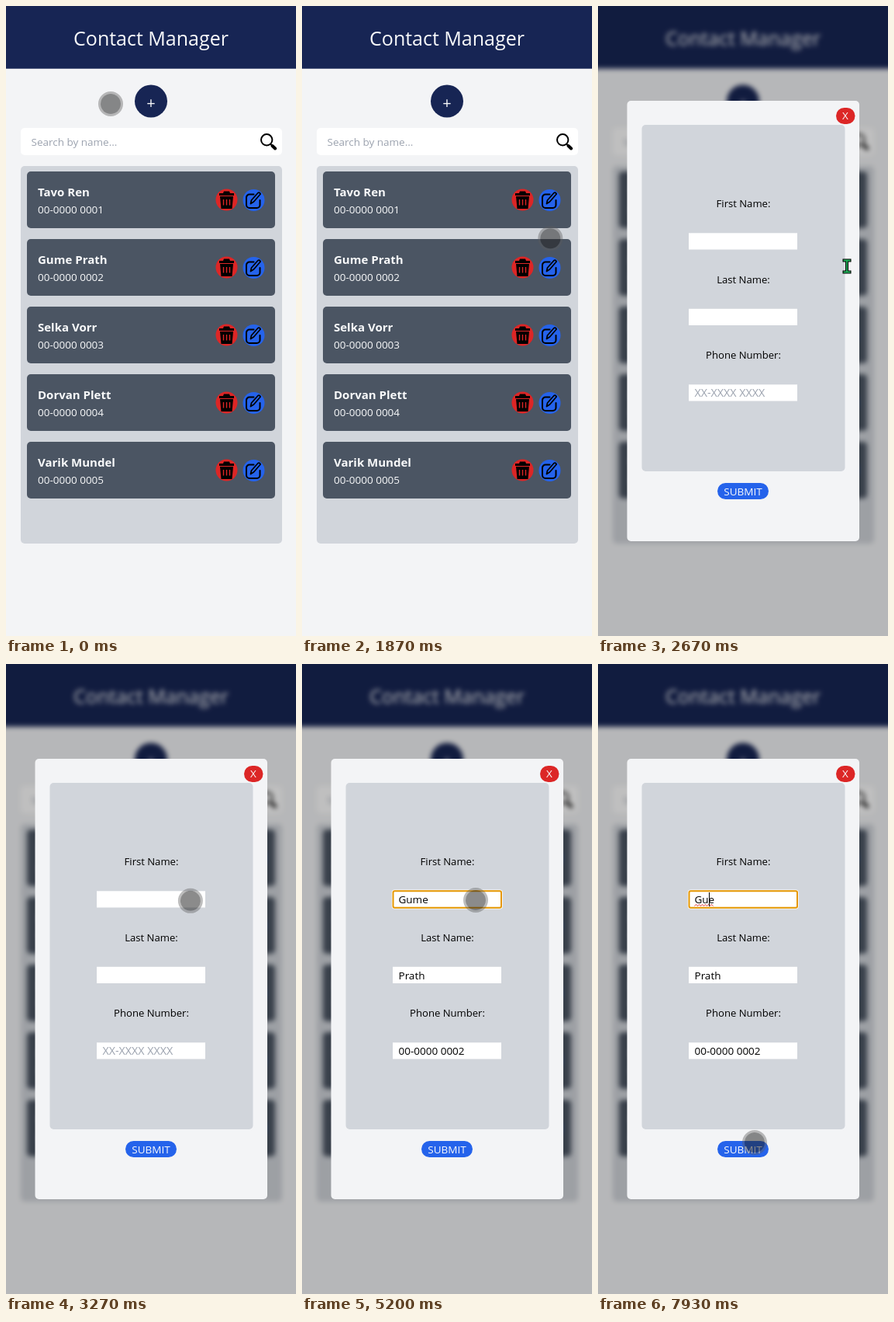
An HTML page for the animation above (8000 ms loop, 374 by 811 pixels).

```html
<!DOCTYPE html>
<html lang="en">
<head>
<meta charset="utf-8">
<title>Contact Manager</title>
<style>
  html, body { margin: 0; width: 100%; height: 100%; overflow: hidden; background: #f3f4f6; }
  svg { display: block; width: 100%; height: 100%; }
  text { font: 13.5px "Open Sans", "Noto Sans", sans-serif; white-space: pre; }
  .light { fill: #f9fafb; }
  .hint { fill: #9ca3af; }
  .center { text-anchor: middle; }
  .title { font-size: 25px; }
  .plus { font-size: 20px; }
  .name { font-size: 15px; font-weight: 700; }
  .label { font-size: 13.1px; }
  .mask { font-size: 14.3px; }
  .line { fill: none; stroke: #000; stroke-linecap: round; stroke-linejoin: round; }
  .blurred { filter: blur(3px); }
</style>
</head>
<body>
<svg viewBox="0 0 374 811">
  <defs>
    <g id="trash">
      <circle r="14" fill="#dc2626"/>
      <path d="M-9.5-8.5h5l1-2.5h7l1 2.5h5v3h-19z M-8.5-4.5h17l-1.5 16h-14z"/>
      <path d="M-4-.5v7.5M0-.5v7.5M4-.5v7.5" stroke="#dc2626" stroke-width="1.4"/>
    </g>
    <g id="edit">
      <circle r="14" fill="#2563eb"/>
      <path class="line" stroke-width="2" d="M0-7.5h-5.500a4 4 0 0 0-4 4v9.500a4 4 0 0 0 4 4h9.500a4 4 0 0 0 4-4v-6"/>
      <path class="line" stroke-width="1.7" d="M-4 4.500l1-4.500l8.500-9.500q2-1 3.200 1.500l-8.700 10z"/>
    </g>
  </defs>

  <g id="page">
    <rect x="-30" y="-30" width="434" height="871" fill="#f3f4f6"/>
    <rect x="-30" y="-30" width="434" height="110.700" fill="#172554"/>
    <text class="title light center" x="187" y="51">Contact Manager</text>
    <circle cx="187" cy="122.500" r="21" fill="#172554"/>
    <text class="plus light center" x="187" y="132">+</text>
    <rect x="19" y="157" width="337" height="35" rx="5" fill="#fff"/>
    <text class="hint" x="32.500" y="180">Search by name...</text>
    <circle class="line" cx="336.200" cy="172.300" r="7.200" stroke-width="2"/>
    <path class="line" d="M341.500 178l1.500 1.500" stroke-width="2"/>
    <path class="line" d="M343.500 180l3.700 3.500" stroke-width="4"/>
    <rect x="19" y="206" width="337" height="486" rx="5" fill="#d1d5db"/>
    <g id="cards"></g>
  </g>

  <g id="modal">
    <rect width="374" height="811" fill-opacity=".25"/>
    <rect x="37.500" y="122" width="299.500" height="567" rx="5" fill="#f3f4f6"/>
    <rect x="56.500" y="153" width="262" height="446" rx="5" fill="#d1d5db"/>
    <rect x="307" y="131" width="24.500" height="21" rx="10.500" fill="#dc2626"/>
    <text class="light center" x="319" y="146">X</text>
    <g id="fields"></g>
    <g id="focus" fill="none">
      <rect x="117.500" y="292.300" width="139.500" height="21.500" rx="2" stroke="#fff" stroke-width="3.500"/>
      <rect x="117.500" y="292.300" width="139.500" height="21.500" rx="2" stroke="#e59700" stroke-width="2"/>
    </g>
    <path id="squiggle" fill="none" stroke="#e03030"/>
    <rect id="caret" y="294" width="1" height="18"/>
    <rect x="154" y="614" width="66" height="21" rx="10.500" fill="#2563eb"/>
    <text class="light center" x="187" y="629.700">SUBMIT</text>
  </g>

  <g id="touch">
    <circle r="14.500" fill="none" stroke="#5a5a5a" stroke-opacity=".4" stroke-width="3"/>
    <circle r="13" fill="#202020" fill-opacity=".52"/>
  </g>
  <g id="beam" fill="none" stroke-linecap="square">
    <path d="M-3.500-7.500h7M0-7.500v15M-3.500 7.500h7" stroke="#000" stroke-width="4"/>
    <path d="M-3.500-7.500h7M0-7.500v15M-3.500 7.500h7" stroke="#21b35a" stroke-width="1.800"/>
  </g>
</svg>

<script>
const LOOP = 8000, FPS = 15;
const $ = id => document.getElementById(id);

const contacts = ["Tavo Rend", "Gume Prath", "Selka Vorr", "Dorvan Plett", "Varik Mundel"];
contacts[0] = "Tavo Ren";
const phone = i => `00-0000 000${i + 1}`;

$("cards").innerHTML = contacts.map((name, i) => `
  <g transform="translate(0 ${i * 87})">
    <rect x="27" y="213" width="320" height="73" rx="5" fill="#4b5563"/>
    <text class="name light" x="41" y="245">${name}</text>
    <text class="light" x="41" y="267">${phone(i)}</text>
    <use href="#trash" x="284.5" y="249.5"/>
    <use href="#edit" x="319.5" y="250"/>
  </g>`).join("");

$("fields").innerHTML = ["First Name:", "Last Name:", "Phone Number:"].map((label, i) => `
  <g transform="translate(0 ${i * 97.5})">
    <text class="label center" x="187.5" y="259">${label}</text>
    <rect x="117" y="292.3" width="140" height="21.2" fill="#fff"/>
    <text id="value${i}" x="124.5" y="308"></text>
  </g>`).join("");

const pen = document.createElement("canvas").getContext("2d");
pen.font = '13.5px "Open Sans", "Noto Sans", sans-serif';
const textWidth = s => pen.measureText(s).width;

// Pointer path: time, x, y
const path = [
  [133, 135, 126], [933, 291, 265], [1000, 290, 264], [1733, 320, 296],
  [1800, 320, 297], [2267, 326, 336], [2400, 321, 335], [2667, 321, 335],
  [3400, 230, 302], [3467, 226, 303], [4133, 226, 303], [4200, 225, 306],
  [4267, 224, 304], [7467, 224, 304], [7800, 203, 606], [7867, 202, 620], [7933, 202, 616]
];

// First-name field: time, value, text left of the caret (null hides it)
const typing = [
  [0, "", null], [3800, "", ""], [3930, "Gume ", "Gume "], [4260, "Gume ", null],
  [4730, "Gume ", "Gume "], [5200, "Gume ", null], [5730, "Gume ", "Gume "],
  [6200, "Gume ", "Gume"], [6530, "Gume ", "Gum"], [6860, "Gue ", "Gu"],
  [7000, "Gue ", null], [7530, "Gue ", "Gu"]
];

function pointerAt(t) {
  const next = path.findIndex(p => p[0] > t);
  if (next < 0) return path.at(-1).slice(1);
  if (next === 0) return path[0].slice(1);
  const [t0, x0, y0] = path[next - 1], [t1, x1, y1] = path[next];
  const u = (t - t0) / (t1 - t0), e = u * u * (3 - 2 * u);
  return [x0 + (x1 - x0) * e, y0 + (y1 - y0) * e];
}

const show = (id, on) => $(id).setAttribute("visibility", on ? "visible" : "hidden");

function squiggle(width) {
  let d = "M124.5 311.5";
  for (let x = 2, up = true; x <= width; x += 2, up = !up) d += `L${124.5 + x} ${up ? 309.5 : 311.5}`;
  return d;
}
$("squiggle").setAttribute("d", squiggle(textWidth("Gue")));

function draw(t) {
  const open = t >= 2660, filled = t >= 3930;
  $("modal").style.display = open ? "" : "none";
  $("page").classList.toggle("blurred", open);

  const [, value, before] = typing.findLast(step => t >= step[0]);
  $("value0").textContent = value;
  $("value1").textContent = filled ? contacts[1].split(" ")[1] : "";
  $("value2").textContent = filled ? phone(1) : "XX-XXXX XXXX";
  $("value2").setAttribute("class", filled ? "" : "hint mask");
  show("focus", t >= 3800);
  show("squiggle", t >= 7530);
  show("caret", before !== null);
  if (before !== null) $("caret").setAttribute("x", Math.round(124.5 + textWidth(before)));

  const beam = t >= 2600 && t < 2730, at = `translate(${pointerAt(t)})`;
  for (const id of ["touch", "beam"]) $(id).setAttribute("transform", at);
  show("touch", !beam);
  show("beam", beam);
}

const start = performance.now();
function tick() {
  const elapsed = (performance.now() - start) % LOOP;
  const frame = Math.floor((elapsed + 5) * FPS / 1000) % (LOOP * FPS / 1000);
  draw(frame * 1000 / FPS + 0.5);
  requestAnimationFrame(tick);
}
tick();
</script>
</body>
</html>
```
